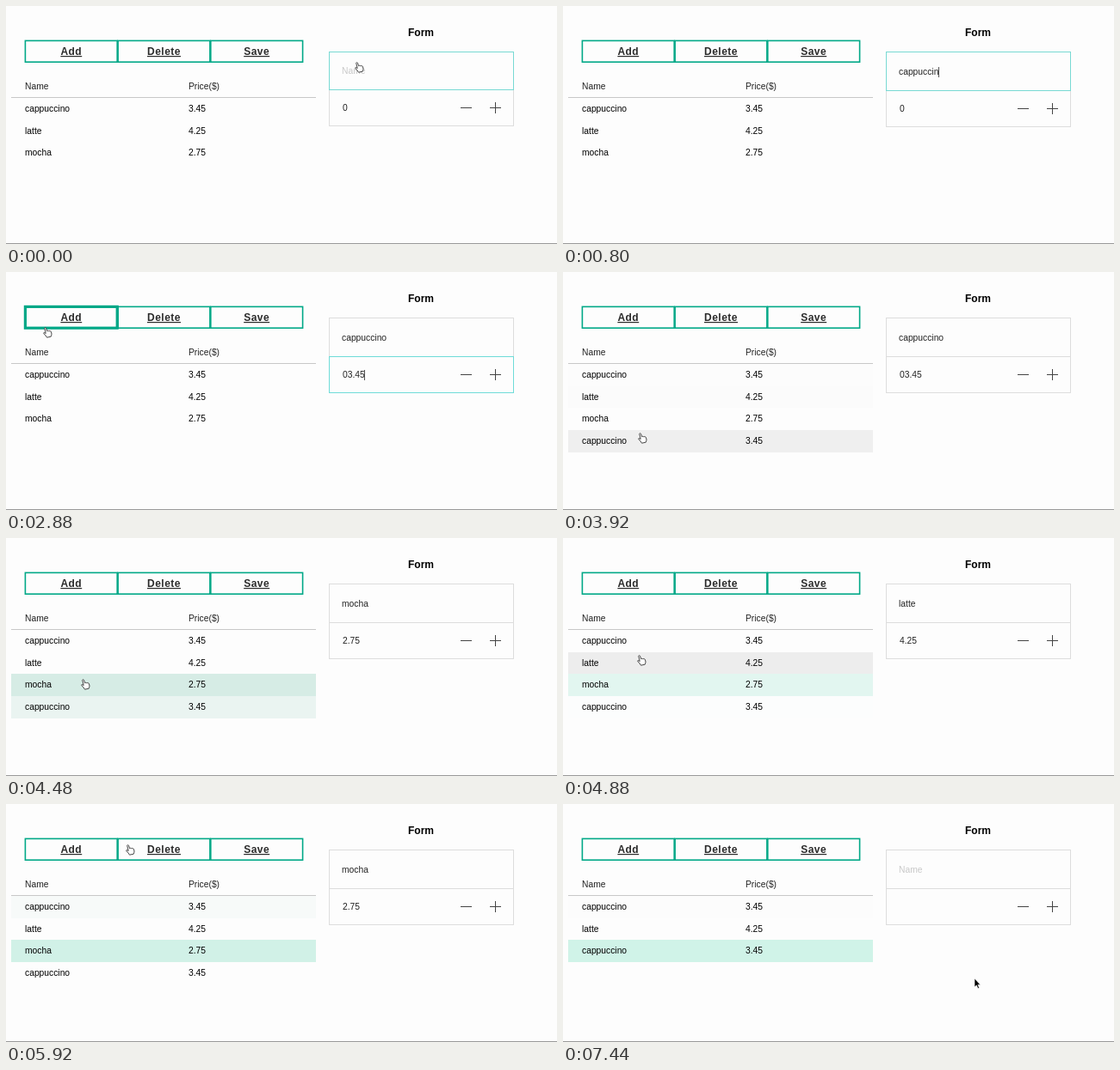
An HTML page that plays this animation: 640x277 px, repeating every 7840 ms.

```html
<!DOCTYPE html>
<html lang="en">
<head>
<meta charset="utf-8">
<title>Editable price table</title>
<style>
html, body { margin: 0; width: 100%; height: 100%; overflow: hidden; background: #fdfdfd; }
svg { display: block; width: 640px; height: 277px; }
text { font: 10.3px "Liberation Sans", Arial, sans-serif; white-space: pre; }
.title { font-size: 12px; font-weight: bold; text-anchor: middle; }
.button { font-size: 12px; font-weight: bold; text-anchor: middle; letter-spacing: .5px; text-decoration: underline; }
</style>
</head>
<body>
<svg id="stage" viewBox="0 0 640 277"></svg>
<script>
const LOOP = 7840, STEP = 80, ROW = 25.7, TOP = 107;
const stage = document.getElementById('stage');
const pen = document.createElement('canvas').getContext('2d');
pen.font = '10.3px "Liberation Sans", Arial, sans-serif';

// Pointer path: time, x, y, shape (h hand, a arrow, - hidden)
const path = [
  [0, 405, 65, 'h'], [160, 405, 65, 'h'], [240, 424, 108, '-'],
  [2080, 424, 108, 'h'], [2160, 429, 106, 'h'], [2240, 429, 106, 'h'],
  [2320, 300, 85, 'a'], [2400, 230, 68, 'a'], [2480, 230, 68, 'a'],
  [2560, 130, 66, 'a'], [2640, 60, 64, 'h'], [2880, 43, 64, 'h'],
  [3040, 60, 52, 'h'], [3360, 60, 52, 'h'], [3440, 65, 70, 'h'],
  [3760, 86, 186, 'h'], [3920, 87, 187, 'h'], [4320, 87, 187, 'h'],
  [4400, 87, 165, 'h'], [4560, 87, 163, 'h'], [4640, 86, 150, 'h'],
  [4720, 86, 136, 'h'], [4960, 86, 136, 'h'], [5120, 86, 115, 'h'],
  [5280, 86, 115, 'h'], [5520, 90, 165, 'h'], [5680, 92, 166, 'h'],
  [5840, 128, 72, 'h'], [5920, 139, 47, 'h'], [6080, 160, 50, 'h'],
  [6400, 170, 50, 'h'], [7040, 170, 50, 'h'], [7200, 400, 165, 'a'],
  [7280, 478, 203, 'a'], [LOOP, 478, 203, 'a']
];
const price = [[0, '0'], [1520, '03'], [1600, '03.'], [1760, '03.4'], [1920, '03.45'],
  [4160, '3.45'], [4400, '2.75'], [4880, '4.25'], [5200, '3.45'], [5600, '2.75'], [6480, '']];
const name = [[0, ''], [960, 'cappuccino'], [4400, 'mocha'], [4880, 'latte'],
  [5200, 'cappuccino'], [5600, 'mocha'], [6480, '']];
const selected = [[0, -1], [4160, 3], [4400, 2], [4880, -1], [4960, 1], [5200, 0], [5600, 2]];
const focus = [[0, 'name'], [960, 'price'], [3200, '']];

const at = (list, t) => list.findLast(k => k[0] <= t)[1];

function pointer(t) {
  const i = Math.max(0, path.findLastIndex(k => k[0] <= t));
  const a = path[i], b = path[i + 1] || a;
  const p = b === a ? 0 : (t - a[0]) / (b[0] - a[0]);
  return { x: a[1] + (b[1] - a[1]) * p, y: a[2] + (b[2] - a[2]) * p, shape: a[3] };
}

// Row highlights ease towards their state once per step
function highlights(t) {
  const hover = [0, 0, 0, 0], chosen = [0, 0, 0, 0];
  for (let s = 0; s <= t; s += STEP) {
    const p = pointer(s);
    const over = p.shape === 'h' && p.x < 360 ? Math.floor((p.y - TOP) / ROW) : -1;
    for (let i = 0; i < 4; i++) {
      hover[i] += ((over === i) - hover[i]) * .4;
      chosen[i] += ((at(selected, s) === i) - chosen[i]) * .4;
    }
  }
  return { hover, chosen };
}

const text = (x, y, s, fill = '#000', cls = '') =>
  `<text x="${x}" y="${y}" fill="${fill}" class="${cls}">${s}</text>`;
const box = (x, y, w, h, stroke, width = 1) =>
  `<rect x="${x}" y="${y}" width="${w}" height="${h}" fill="none" stroke="${stroke}" stroke-width="${width}"/>`;
const fill = (x, y, w, h, color, alpha = 1) =>
  `<rect x="${x}" y="${y}" width="${w}" height="${h}" fill="${color}" opacity="${alpha}"/>`;
const caret = (x, y, s) => fill(Math.floor(x + pen.measureText(s).width), y - 9, 1, 12, '#555');

function buttons(t) {
  const p = pointer(t - STEP);
  return ['Add', 'Delete', 'Save'].map((label, i) => {
    const x = 22.4 + 107.7 * i;
    const over = t > STEP && p.shape === 'h' && p.x > x && p.x < x + 106.8 && p.y > 40 && p.y < 65;
    return box(x, 40.4, 106.8, 24.8, '#00a887', over ? 3.2 : 1.6)
      + text(x + 53.4, 57, label, '#2b2b2b', 'button');
  }).join('');
}

function table(t) {
  const rows = [['cappuccino', '3.45'], ['latte', '4.25'], ['mocha', '2.75']];
  if (t >= 3360) rows.push(rows[0]);
  if (t >= 6480) rows.splice(2, 1);
  const { hover, chosen } = highlights(t);
  const body = rows.map(([item, cost], i) => {
    const y = Math.round(TOP + ROW * i), h = Math.round(TOP + ROW * (i + 1)) - y;
    return fill(6, y, 354, h, '#000', .071 * hover[i])
      + fill(6, y, 354, h, '#00c285', .18 * chosen[i])
      + text(22, 123 + ROW * i, item) + text(212, 123 + ROW * i, cost);
  }).join('');
  return text(22, 97, 'Name', '#222') + text(212, 97, 'Price($)', '#222')
    + body + fill(6, 106, 354, 1, '#c8c8c8');
}

function form(t) {
  const shift = t < 240 ? -1 : 0, active = at(focus, t);
  const typed = t < 240 ? 0 : Math.floor((t - 240) / 64) + 1;
  const item = t < 960 ? 'cappuccino'.slice(0, typed) : at(name, t);
  const cost = at(price, t);
  const nameBox = color => box(375.5, 53.5, 214, 45 + shift, color);
  const priceBox = color => box(375.5, 98.5 + shift, 214, 42, color);
  const y = 119 + shift, mid = y + .5;
  let out = text(482, 35, 'Form', '#000', 'title') + nameBox('#ddd') + priceBox('#ddd');
  if (active === 'name') out += nameBox('#78d9d3');
  if (active === 'price') out += priceBox('#6fdcd8');
  out += text(390, 79.5 + shift / 2, item || 'Name', item ? '#222' : '#c8c8c8')
    + text(391, 123 + shift, cost, '#222');
  if (active === 'name' && item) out += caret(390, 80, item);
  if (active === 'price') out += caret(391, 123, cost);
  return out + `<path d="M528 ${mid}h13M562 ${mid}h13M568.5 ${y - 6}v13" stroke="#444"/>`;
}

function cursor(t) {
  const { x, y, shape } = pointer(t);
  if (shape === '-') return '';
  const art = shape === 'h'
    ? '<path d="M1.7 1.3Q2.7 0 3.5 1.3L4.6 4.8Q5.5 3.9 6.3 4.7 7.3 4 7.9 4.9 9 4.4 9.4 5.6L10 8Q10 9 9.2 11.2L4.5 12.2Q3.4 10 .9 7.7.3 6.4 1.7 6.6L3.2 7.5Z" fill="#fff" stroke="#333" stroke-width=".9"/>'
    : '<path d="M0 0V10L2.3 8 4 11.8 5.5 11.1 3.9 7.4H6.8Z" stroke="#fff" stroke-width=".6"/>';
  return `<g transform="translate(${x} ${y})">${art}</g>`;
}

let shown = -1;
function draw(now) {
  const t = Math.floor(now % LOOP / STEP) * STEP;
  if (t !== shown) {
    shown = t;
    stage.innerHTML = buttons(t) + table(t) + form(t) + fill(0, 276, 640, 1, '#999') + cursor(t);
  }
  requestAnimationFrame(tick);
}
const start = performance.now();
function tick() { draw(performance.now() - start); }
tick();
</script>
</body>
</html>
```
